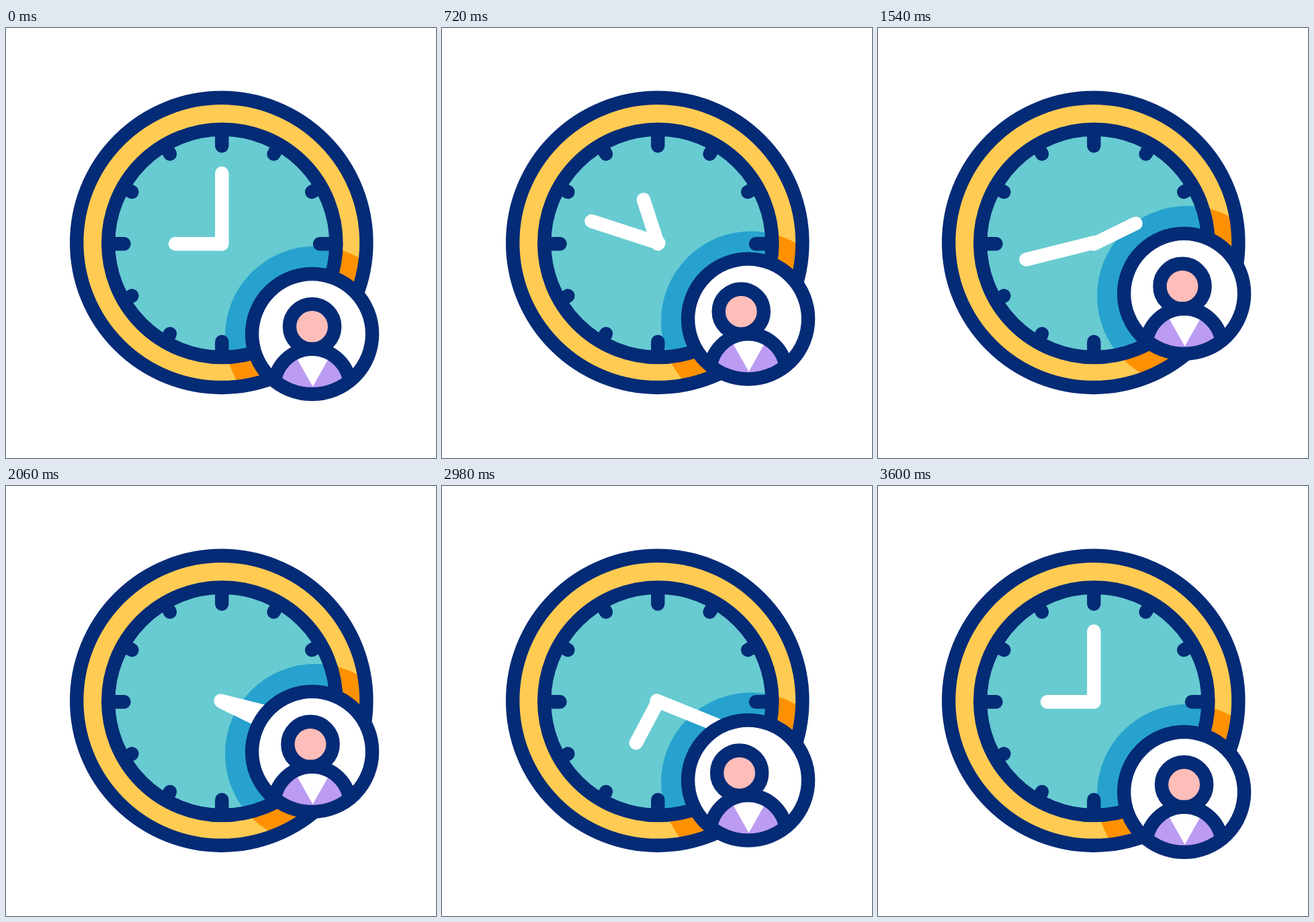
Write an HTML page with a canvas that moves like this. It is 640 px wide and 640 px high and loops after 3620 ms.

```html
<!DOCTYPE html>
<html lang="en">
<head>
<meta charset="utf-8">
<title>Working hours</title>
<style>
html, body { margin: 0; width: 100%; height: 100%; overflow: hidden; background: #fff; }
canvas { display: block; width: 640px; height: 640px; }
</style>
</head>
<body>
<canvas id="stage" width="640" height="640"></canvas>
<script>
const ctx = document.getElementById('stage').getContext('2d');
const LOOP = 3620, TURN = 3600, STEP = 20, LINE = 20.4, TAU = Math.PI * 2;
const NAVY = '#042b76', YELLOW = '#ffcb53', ORANGE = '#ff9100', TEAL = '#67cbd1',
  BLUE = '#27a2ce', PINK = '#ffbdb9', PURPLE = '#bc9bf3', WHITE = '#fff';
const HUB = 321.3;

// Eased value between [time, value] keys.
function keyed(keys, t) {
  const i = Math.max(1, keys.findIndex(k => k[0] >= t));
  const [t0, v0] = keys[i - 1], [t1, v1] = keys[i];
  const s = (t - t0) / (t1 - t0);
  return v0 + (v1 - v0) * s * s * (3 - 2 * s);
}
const LIFT = [[0, 0], [1800, 63.7], [3600, 0]];
const SWAY = [[0, 0], [600, -13], [1200, 13], [1800, -13], [2400, 13], [3000, -13], [3600, 0]];

function circle(x, y, r, fill, stroke) {
  ctx.beginPath();
  ctx.arc(x, y, r, 0, TAU);
  if (fill) { ctx.fillStyle = fill; ctx.fill(); }
  if (stroke) { ctx.strokeStyle = stroke; ctx.stroke(); }
}

function line(x1, y1, x2, y2, color) {
  ctx.strokeStyle = color;
  ctx.beginPath();
  ctx.moveTo(x1, y1);
  ctx.lineTo(x2, y2);
  ctx.stroke();
}

function within(x, y, r, paint) {
  ctx.save();
  ctx.beginPath();
  ctx.arc(x, y, r, 0, TAU);
  ctx.clip();
  paint();
  ctx.restore();
}

function shadedDisc(x, y, r, fill, shade, lift) {
  circle(x, y, r, fill);
  within(x, y, r, () => circle(460, 458.8 - lift, 134, shade));
  circle(x, y, r, null, NAVY);
}

function hand(x, y, angle, dx, dy) {
  ctx.save();
  ctx.translate(x, y);
  ctx.rotate(angle);
  ctx.translate(-x, -y);
  line(HUB, HUB, HUB + dx, HUB + dy, WHITE);
  ctx.restore();
}

function drawClock(turn, lift) {
  shadedDisc(320.8, 319.4, 215.6, YELLOW, ORANGE, lift);
  shadedDisc(321.8, 320.5, 169.6, TEAL, BLUE, lift);
  for (let i = 0; i < 12; i++) {
    const a = i * TAU / 12, c = Math.cos(a), s = Math.sin(a);
    const inner = i % 3 ? 154.5 : 145.7;
    line(HUB + inner * c, HUB + inner * s, HUB + 168 * c, HUB + 168 * s, NAVY);
  }
  hand(HUB, HUB, turn, -69.3, 0);
  hand(321, 319.8, turn * 4, 0, -105.2);
}

function drawBadge(lift, sway) {
  const x = 455.6, y = 455.5 - lift, bodyY = y + 78.7;
  circle(x, y, 89.5, WHITE);
  within(x, y, 89.5, () => {
    circle(x + sway, y - 11, 33.6, PINK, NAVY);
    circle(x, bodyY, 56.4, PURPLE);
    within(x, bodyY, 56.4, () => {
      ctx.fillStyle = WHITE;
      ctx.beginPath();
      ctx.moveTo(x - 27.6, y + 27.5);
      ctx.lineTo(x + 1, y + 78.3);
      ctx.lineTo(x + 29.6, y + 27.5);
      ctx.fill();
    });
    circle(x, bodyY, 56.4, null, NAVY);
  });
  circle(x, y, 89.5, null, NAVY);
}

function draw(now) {
  const t = Math.min(TURN, Math.floor((now % LOOP) / STEP) * STEP);
  const lift = keyed(LIFT, t);
  ctx.fillStyle = WHITE;
  ctx.fillRect(0, 0, 640, 640);
  ctx.lineWidth = LINE;
  ctx.lineCap = 'round';
  drawClock(t / TURN * TAU, lift);
  drawBadge(lift, keyed(SWAY, t));
}

let start;
function tick(now) {
  start ??= now;
  draw(Math.max(0, now - start));
  requestAnimationFrame(tick);
}
draw(0);
requestAnimationFrame(tick);
</script>
</body>
</html>
```
